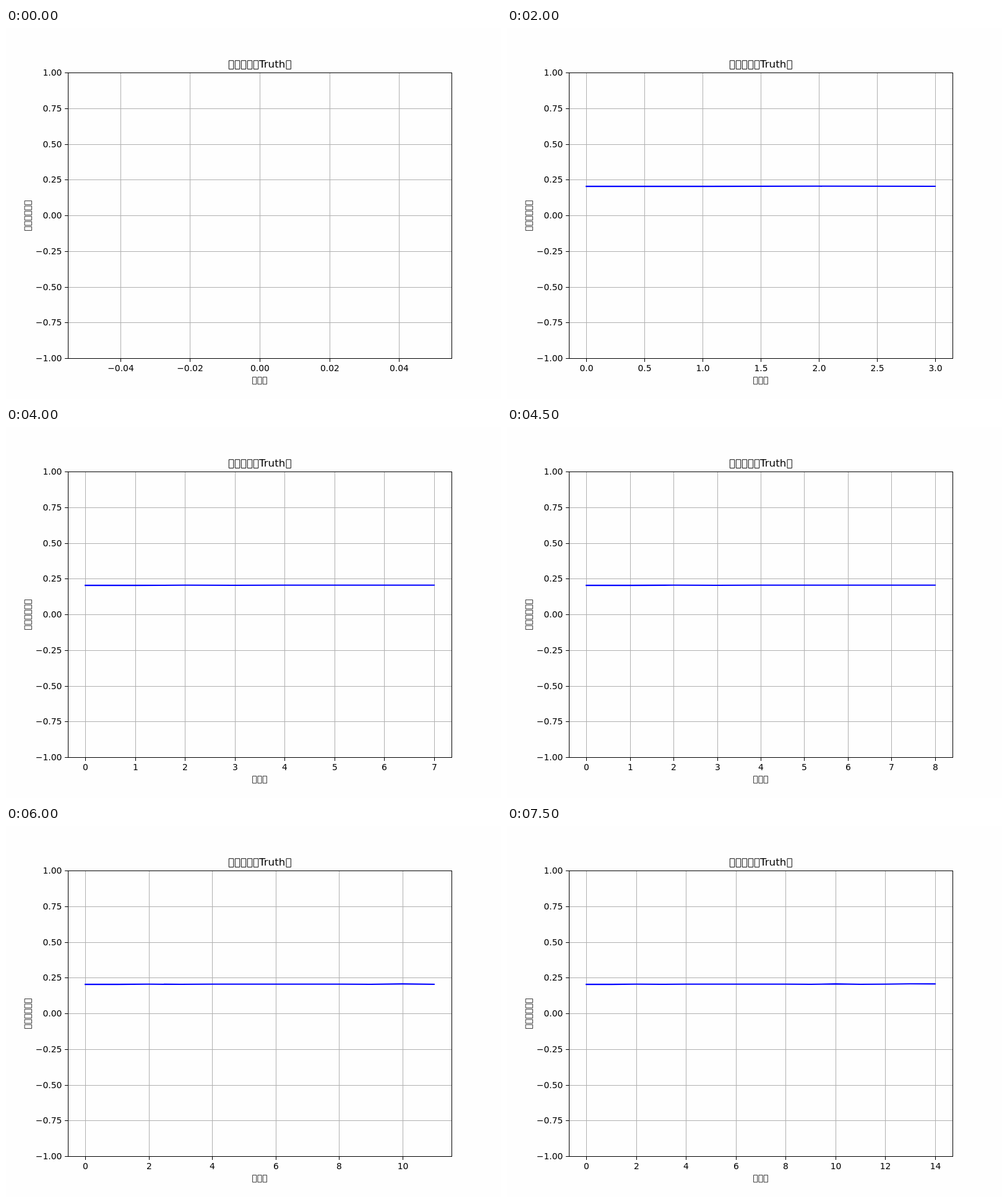
An HTML page that plays this animation: 800x600 px, repeating every 8000 ms.

```html
<!DOCTYPE html>
<html lang="en">
<head>
<meta charset="utf-8">
<title>Growing line chart</title>
<style>
  html, body { margin: 0; width: 100%; height: 100%; overflow: hidden; background: #fefefe; }
  svg { display: block; width: 800px; height: 600px; }
  text { font: 13.89px "DejaVu Sans", sans-serif; fill: #000; }
  .title { font-size: 16.67px; }
  .rule { fill: none; stroke-width: 1; shape-rendering: crispEdges; }
  .grid { stroke: #b0b0b0; }
  .axis { stroke: #000; }
  .box { fill: none; stroke: #000; }
  .curve { fill: none; stroke: #00f; stroke-width: 2.08; stroke-linecap: square; stroke-linejoin: round; }
</style>
</head>
<body>
<svg viewBox="0 0 800 600">
  <path id="grid" class="rule grid"/>
  <path id="curve" class="curve"/>
  <path id="ticks" class="rule axis"/>
  <rect class="rule axis" x="100.5" y="72.5" width="620" height="462"/>
  <g id="xLabels" text-anchor="middle"></g>
  <g id="yLabels" text-anchor="end"></g>
  <g id="captions"><text class="title" x="409" y="64">Truth</text></g>
</svg>
<script>
const LEFT = 100, RIGHT = 720, TOP = 72, BOTTOM = 534;
const STEP_MS = 500, LOOP_MS = 8000;
const NICE = [0.02, 0.2, 0.25, 0.5, 1, 2];
const VALUES = [0.203, 0.203, 0.2042, 0.2034, 0.2045, 0.2042, 0.2048, 0.2043,
                0.2046, 0.2034, 0.206, 0.2038, 0.2048, 0.207, 0.2063];

const byId = id => document.getElementById(id);
const snap = v => Math.floor(v + 0.5) + 0.5;
const yPos = v => (TOP + BOTTOM) / 2 - v * (BOTTOM - TOP) / 2;
const label = (x, y, str) => `<text x="${x}" y="${y}">${str.replace('-', '\u2212')}</text>`;

// A row of empty glyph boxes starting at x on the given baseline.
function boxes(x, baseline, size, count, turn = '') {
  let d = '';
  for (let i = 0; i < count; i++) {
    const left = x + (0.6 * i + 0.078) * size;
    d += `M${left} ${baseline - 0.677 * size}h${0.444 * size}v${0.826 * size}h${-0.444 * size}z`;
  }
  return `<path class="box" stroke-width="${0.056 * size}" d="${d}" transform="${turn}"/>`;
}

byId('captions').insertAdjacentHTML('beforeend',
  boxes(359, 64, 16.67, 5) + boxes(451.7, 64, 16.67, 1) +
  boxes(397.5, 574, 13.89, 3) +
  boxes(-25, 0, 13.89, 6, 'translate(39.5 303.5) rotate(-90)'));

let yGrid = '', yTicks = '', yText = '';
for (let v = -1; v <= 1; v += 0.25) {
  const y = snap(yPos(v));
  yGrid += `M${LEFT} ${y}H${RIGHT}`;
  yTicks += `M95 ${y}H${LEFT}`;
  yText += label(90.3, y + 4.5, v.toFixed(2));
}
byId('yLabels').innerHTML = yText;

function draw(last) {
  const lo = last > 0 ? -0.05 * last : -0.055;
  const hi = last > 0 ? 1.05 * last : 0.055;
  const xPos = v => LEFT + (v - lo) / (hi - lo) * (RIGHT - LEFT);
  const step = NICE.find(s => s >= (hi - lo) / 9);
  const digits = step >= 1 ? 0 : step === 0.25 || step < 0.1 ? 2 : 1;

  let grid = yGrid, ticks = yTicks, text = '';
  for (let i = Math.ceil(lo / step); i * step <= hi; i++) {
    const x = snap(xPos(i * step));
    grid += `M${x} ${TOP}V${BOTTOM}`;
    ticks += `M${x} ${BOTTOM}V540`;
    text += label(x, 555, (i * step).toFixed(digits));
  }
  byId('grid').setAttribute('d', grid);
  byId('ticks').setAttribute('d', ticks);
  byId('xLabels').innerHTML = text;

  const points = VALUES.slice(0, last + 1).map((v, i) => `${xPos(i)} ${yPos(v)}`);
  byId('curve').setAttribute('d', last > 0 ? 'M' + points.join('L') : '');
}

let shown = -1;
function frame() {
  const last = Math.max(0, Math.floor(performance.now() % LOOP_MS / STEP_MS) - 1);
  if (last !== shown) draw(shown = last);
  requestAnimationFrame(frame);
}
frame();
</script>
</body>
</html>
```
